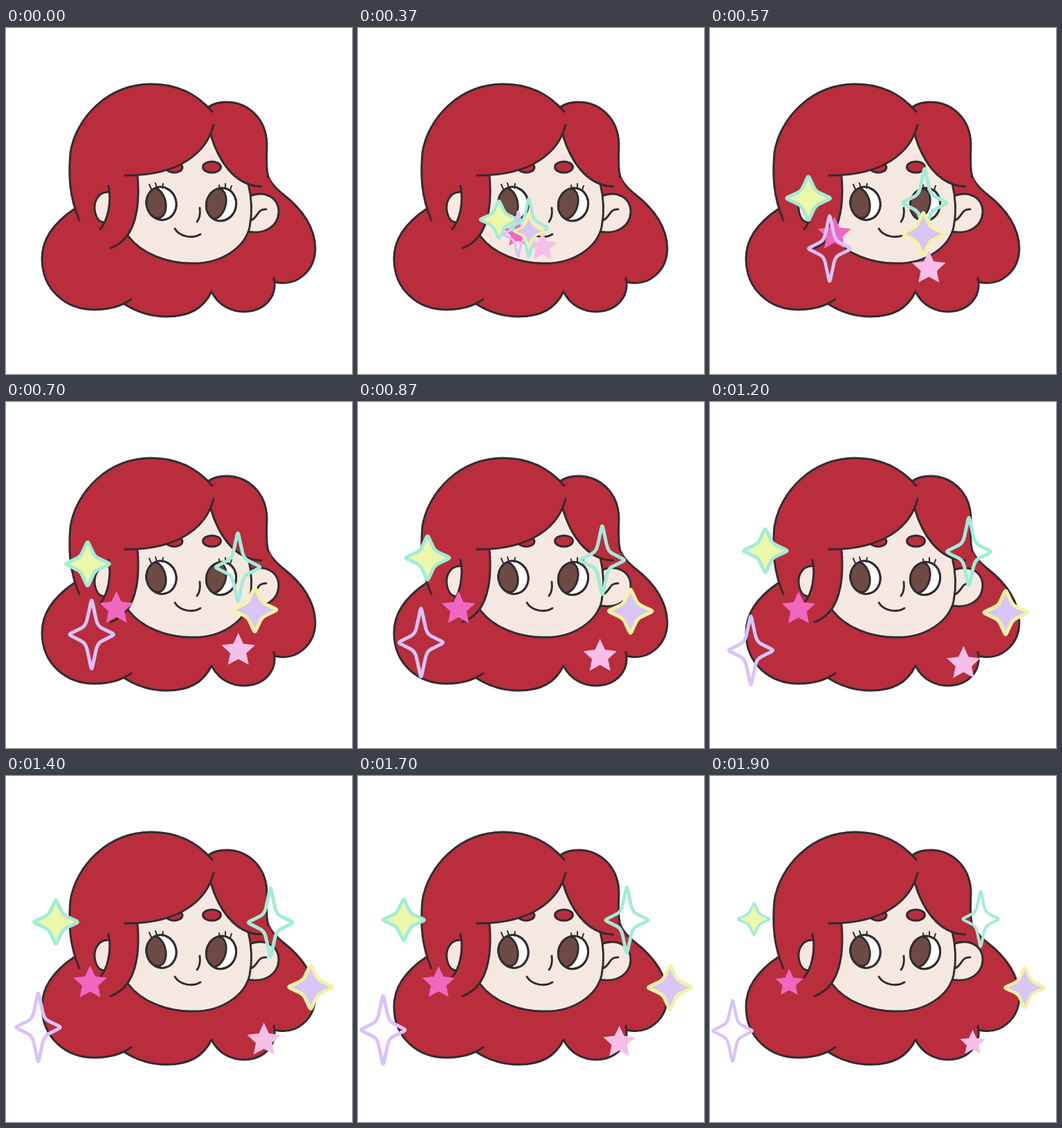
Animation, 500 px wide and 500 px high, one loop 1930 ms. Source, as an HTML page:

```html
<!DOCTYPE html>
<html lang="en">
<head>
<meta charset="utf-8">
<title>Sparkles</title>
<style>
  html, body { margin: 0; width: 100%; height: 100%; overflow: hidden; background: #fff; }
  svg { display: block; width: 100vw; height: 100vh; }
  .line { fill: none; stroke: #302c2d; stroke-width: 2.9; stroke-linecap: round; stroke-linejoin: round; }
  .hair { fill: #b92d3d; }
  .skin { fill: #f5e8e1; }
  .iris { fill: #6d4a46; }
</style>
</head>
<body>
<svg viewBox="0 0 500 500">
  <defs>
    <ellipse id="eye" rx="21.500" ry="24"/>
    <clipPath id="eyeClip"><use href="#eye"/></clipPath>
  </defs>

  <!-- Back hair -->
  <path class="hair" d="M98 262C70 281 52 305 52 333C52 378 86 407 128 407C146 407 158 404 171 399C190 411 210 417 232 417C264 417 285 406 297 381C307 401 325 410 345 410C374 409 392 388 388 367C421 375 447 350 447 318C446 283 422 257 400 240C387 228 378 215 377 200L290 115L98 200Z"/>
  <path class="line" d="M98 262C70 281 52 305 52 333C52 378 86 407 128 407C150 407 167 402 181 392M171 399C190 411 210 417 232 417C264 417 285 406 297 381C307 401 325 410 345 410C374 409 393 388 387 361M388 367C421 375 447 350 447 318C446 283 422 257 400 240C392 233 384 226 379 216"/>

  <!-- Right ear and face -->
  <path class="line" style="fill:#f5e8e1" d="M352 243C374 234 394 245 394 266C393 286 375 299 348 294"/>
  <path class="line" d="M353 278C364 276 362 261 376 262"/>
  <path class="skin" d="M189 205C192 245 188 280 177 301C195 325 232 341 272 340C312 340 345 317 352 288C356 268 355 245 350 220L296 150Z"/>
  <path class="line" d="M177 301C195 325 232 341 272 340C312 340 345 317 352 288C356 268 355 245 350 225"/>

  <!-- Features -->
  <g class="line">
    <ellipse class="hair" cx="243" cy="201.500" rx="12" ry="7.500"/>
    <ellipse class="hair" cx="297.500" cy="201" rx="13" ry="8"/>
    <g transform="translate(224.500 253.500) rotate(-15)">
      <use href="#eye" fill="#fff"/>
      <ellipse class="iris" cx="-8" cy="-3" rx="14.500" ry="22.500" clip-path="url(#eyeClip)"/>
      <use href="#eye"/>
    </g>
    <g transform="translate(311 255) rotate(15)">
      <use href="#eye" fill="#fff"/>
      <ellipse class="iris" cx="-8" cy="1" rx="14.500" ry="22.500" clip-path="url(#eyeClip)"/>
      <use href="#eye"/>
    </g>
    <path style="stroke-width:2" d="M207 226L210 233M216 224L218 231M227 225L226 231M308 227L309 234M317 225L317 232M326 228L324 234"/>
    <path d="M280 260C281 268 280 275 276 280M244 290C251 302 270 305 281 298"/>
  </g>

  <!-- Front hair -->
  <path class="hair" d="M106 278C92 245 90 215 93 180C101 130 147 81 210 81C254 81 280 100 298 121L300 140C290 180 250 210 190 213C194 258 188 305 151 318L120 305Z"/>
  <path class="hair" d="M292 115C300 109 308 107 318 107C352 107 376 133 377 167C377 184 375 200 379 216L386 228L369 229C328 228 306 188 296 155L300 140Z"/>
  <path class="line" d="M106 278C92 245 90 215 93 180C101 130 147 81 210 81C254 81 280 100 298 121M300 140C290 180 250 214 172 213M190 213C194 258 188 305 151 318M293 114C300 109 308 107 318 107C352 107 376 133 377 167C377 184 375 200 379 216M296 155C306 188 328 228 369 229"/>

  <!-- Left ear -->
  <path class="skin" d="M147 237C130 238 126 255 129 267C131 277 136 281 143 281C150 266 151 252 148 237Z"/>
  <path class="line" d="M147 237C130 238 126 255 129 267C131 276 135 280 141 281M148 228C153 252 147 278 136 291"/>

  <g id="stars"></g>
</svg>
<script>
const LOOP = 1930;
const SVG_NS = "http://www.w3.org/2000/svg";

// [time, value] keys, joined by a smooth monotone curve
const TRAVEL = [[70, 0], [170, .01], [270, .055], [370, .147], [470, .33], [570, .52],
  [700, .667], [1000, .83], [1400, .945], [1700, .982], [2000, 1]];
const GROW = [[70, 0], [270, .67], [370, .86], [570, 1]];

function curve(keys, t) {
  const last = keys.length - 1;
  if (t <= keys[0][0]) return keys[0][1];
  if (t >= keys[last][0]) return keys[last][1];
  const i = keys.findIndex(k => k[0] > t) - 1;
  const slope = j => (keys[j + 1][1] - keys[j][1]) / (keys[j + 1][0] - keys[j][0]);
  const tangent = j => {
    if (j === 0) return slope(0);
    if (j === last) return 0;
    const a = slope(j - 1), b = slope(j);
    return 2 * a * b / (a + b);
  };
  const [t0, v0] = keys[i], [t1, v1] = keys[i + 1];
  const d = t1 - t0, s = (t - t0) / d, r = 1 - s;
  return v0 * r * r * (1 + 2 * s) + v1 * s * s * (3 - 2 * s)
    + d * s * r * (r * tangent(i) - s * tangent(i + 1));
}

// Four points with blunt tips; (vx, vy) is the valley between two of them
function sparklePath(w, h, vx, vy) {
  const corners = [
    [0, -h], [vx, -vy], [w, 0], [vx, vy], [0, h], [-vx, vy], [-w, 0], [-vx, -vy]
  ];
  const between = (a, b, f) => a.map((v, i) => v + (b[i] - v) * f).join(" ");
  const rounded = corners.map((corner, i) => {
    const size = i % 2 ? .25 : .14;
    const before = corners[(i + 7) % 8], after = corners[(i + 1) % 8];
    return `${between(corner, before, size)}Q${corner.join(" ")} ${between(corner, after, size)}`;
  });
  return `M${rounded.join("L")}Z`;
}

function fivePointPath(radius) {
  const points = Array.from({ length: 10 }, (_, i) => {
    const r = i % 2 ? radius * .48 : radius, a = i * Math.PI / 5;
    return `${r * Math.sin(a)} ${.5 - r * Math.cos(a)}`;
  });
  return `M${points.join("L")}Z`;
}

const wide = sparklePath(33, 33, 10.5, 10.5);
const tall = sparklePath(33.5, 52, 8.5, 12.5);
const five = fivePointPath(25.5);

const stars = [
  { d: five, fill: "#f6bfea", from: [247, 304], to: [380, 386], delay: 0, shrink: .25 },
  { d: five, fill: "#f067c1", from: [251, 296], to: [114, 299], delay: 0, shrink: .18 },
  { d: wide, fill: "#edf7a9", stroke: "#a2ecd7", from: [228, 289], to: [63, 206.5], delay: 0, shrink: .28 },
  { d: tall, fill: "none", stroke: "#d9c3f8", from: [243, 294], to: [30.5, 369], delay: 100, shrink: .2 },
  { d: tall, fill: "none", stroke: "#a2ecd7", from: [222, 303], to: [391.5, 206.5], delay: 0, shrink: .19 },
  { d: wide, fill: "#d9c5f7", stroke: "#f4f2a2", from: [235, 293], to: [457, 306], delay: 100, shrink: .17 }
];

const group = document.getElementById("stars");
for (const star of stars) {
  star.node = document.createElementNS(SVG_NS, "path");
  star.node.setAttribute("d", star.d);
  star.node.setAttribute("fill", star.fill);
  star.node.setAttribute("stroke", star.stroke || "none");
  star.node.setAttribute("stroke-width", 5);
  group.append(star.node);
}

// The picture holds between these steps, which repeat every 700 ms
const STEPS = [0, 100, 170, 230, 300, 370, 430, 500, 570, 630];
function hold(t) {
  const base = Math.floor(t / 700) * 700;
  return base + STEPS.filter(step => step <= t - base).pop();
}

function draw(time) {
  const now = hold(time % LOOP);
  for (const { node, from, to, delay, shrink } of stars) {
    const t = now - delay;
    const p = curve(TRAVEL, t);
    const [x, y] = from.map((v, i) => v + (to[i] - v) * p);
    const fade = Math.max(0, (t - 1600) / 300) ** 1.5;
    const scale = curve(GROW, t) * (1 - shrink * fade);
    node.setAttribute("visibility", scale > 0 ? "visible" : "hidden");
    node.setAttribute("transform", `translate(${x} ${y}) scale(${scale})`);
  }
}

const start = performance.now();
function tick() {
  draw(performance.now() - start);
  requestAnimationFrame(tick);
}
tick();
</script>
</body>
</html>
```
